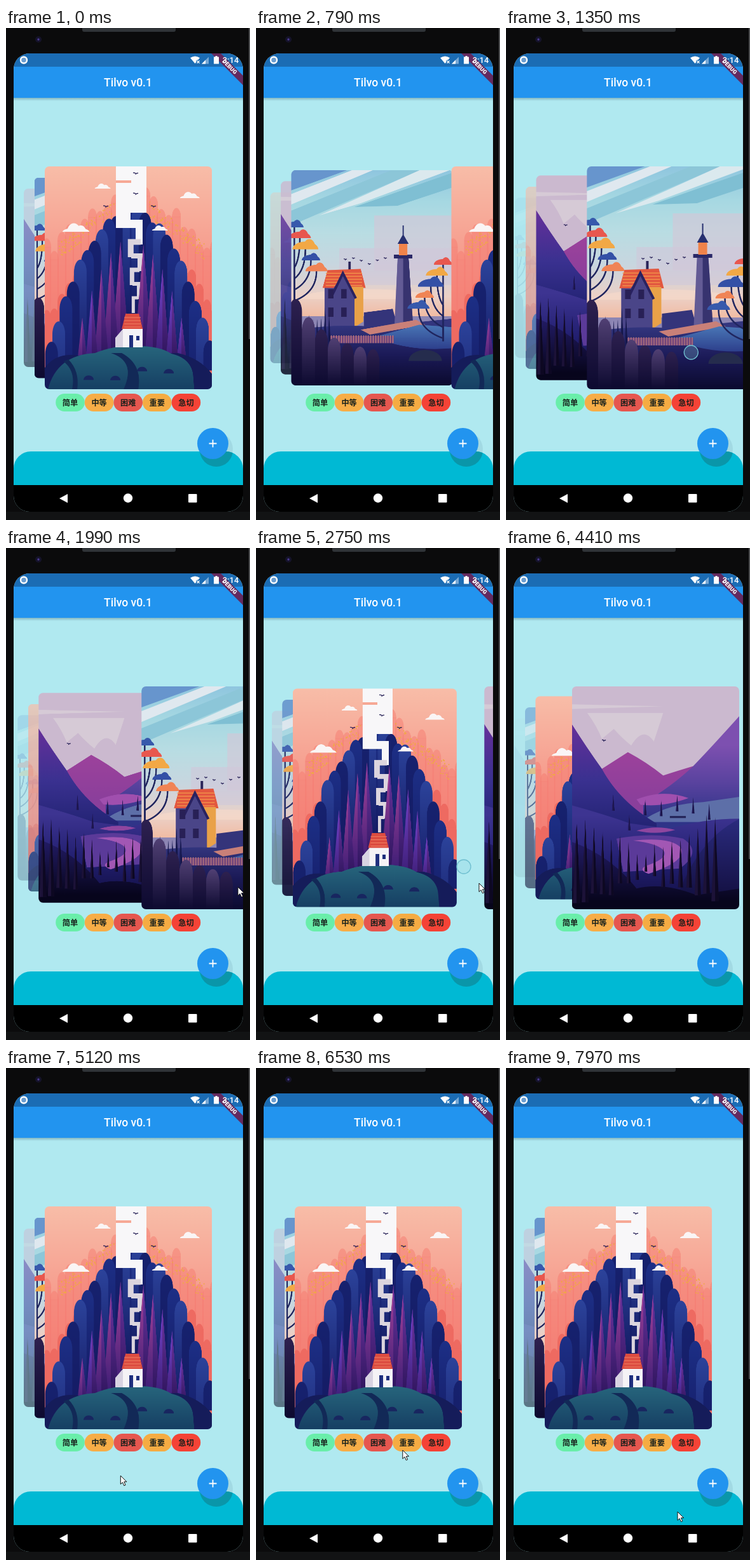
An HTML page with a canvas that plays this animation: 384x775 px, repeating every 8 s.

```html
<!DOCTYPE html>
<html lang="zh">
<head>
<meta charset="utf-8">
<title>Card carousel</title>
<style>
  html, body { margin: 0; width: 100%; height: 100%; overflow: hidden; background: #0b0b0c; }
  svg, canvas { position: absolute; left: 0; top: 0; }
  #cards { left: 12px; top: 218px; }
  text { text-anchor: middle; font-family: Roboto, sans-serif; fill: #fff; }
  #chips text { font: 700 12.2px "Noto Sans CJK SC", "Noto Sans CJK", sans-serif; fill: #17201c; }
</style>
</head>
<body>
<svg width="384" height="775">
  <defs>
    <clipPath id="screen"><rect x="12" y="40" width="361" height="722" rx="25"/></clipPath>
    <clipPath id="bar"><rect x="12" y="667" width="361" height="80" rx="27"/></clipPath>
    <linearGradient id="fade" x2="0" y2="1"><stop stop-color="#245" stop-opacity=".3"/><stop offset="1" stop-color="#245" stop-opacity="0"/></linearGradient>
  </defs>
  <rect y="762" width="384" height="13" fill="#121314"/>
  <rect x="382" width="2" height="490" fill="#4a4b4d"/>
  <rect x="120" y="-4" width="147" height="10" rx="3" fill="#303438"/>
  <circle cx="51" cy="18" r="5" fill="#15132a"/><circle cx="51" cy="18" r="1.7" fill="#4a3a94"/>
  <g clip-path="url(#screen)">
    <rect x="12" y="40" width="361" height="722" fill="#b0e9f0"/>
    <rect x="12" y="110" width="361" height="5" fill="url(#fade)"/>
    <rect x="12" y="61" width="361" height="49" fill="#2294ef"/>
    <rect x="12" y="40" width="361" height="21" fill="#1b6cb4"/>
    <path d="M323 40h15l35 35v15z" fill="#632a60"/>
    <text transform="translate(352 61) rotate(45)" y="3" font-size="8.9" font-weight="900">DEBUG</text>
    <circle cx="28" cy="50.500" r="5" fill="#6c9fd2" stroke="#fff" stroke-width="2.400"/>
    <path d="M290 47q7.500-5 15 0l-7.500 9z" fill="#fff"/>
    <path d="M300 51l4 4m0-4l-4 4" stroke="#1b6cb4" stroke-width="3"/><path d="M300.500 51.500l4 4m0-4l-4 4" stroke="#fff" stroke-width="1.200"/>
    <path d="M308 56.500l11-11v11z" fill="#78a9d6"/><path d="M308 56.500l6-6v6z" fill="#fff"/>
    <path d="M327 45.500h2.500v-1.500h3v1.500h2.500v11h-8z" fill="#fff"/>
    <text x="353.500" y="55" font-size="13" font-weight="500">3:14</text>
    <text x="192" y="92" font-size="17.500" font-weight="500">Tilvo v0.1</text>
    <circle cx="331" cy="663" r="26" fill="#246" opacity=".09"/>
    <rect x="12" y="667" width="361" height="80" rx="27" fill="#00b9d4"/>
    <circle cx="331" cy="665" r="26" fill="#0a96a9" clip-path="url(#bar)"/>
    <circle cx="325.500" cy="654.500" r="24.500" fill="#2294ef"/>
    <path d="M319.500 654.500h12m-6-6v12" stroke="#fff" stroke-width="1.800"/>
    <rect x="12" y="720" width="361" height="42"/>
  </g>
  <path d="M84 741l13-7v14z" fill="#fff"/><circle cx="192" cy="740.500" r="7.200" fill="#fff"/>
  <rect x="287" y="734" width="13.500" height="13.500" rx="1" fill="#fff"/>
  <g id="chips"></g>
</svg>
<canvas id="cards" width="361" height="352"></canvas>
<svg width="384" height="775">
  <circle id="touch" r="11" fill="#8ad2e0" fill-opacity=".25" stroke="#70bfd0" stroke-width="1.300"/>
  <path id="arrow" d="M0 0V13.500L3.200 10.600 5.500 15.800 7.800 14.800 5.500 9.700H9.700Z" fill="#fff" stroke="#111" stroke-linejoin="round"/>
</svg>
<script>
const $ = id => document.getElementById(id);
const chipX = i => 101 + i * 45.6;
$('chips').innerHTML = [['简单', '#69eeaa'], ['中等', '#f7ad47'], ['困难', '#e6574f'], ['重要', '#f5ac43'], ['急切', '#f44336']]
  .map(([word, color], i) => `<rect x="${chipX(i) - 22.8}" y="576" width="45.6" height="28" rx="14" fill="${color}"/><text x="${chipX(i)}" y="595">${word}</text>`).join('');

// Drawing helpers; g is the picture being painted
let g, seed = 7;
const rnd = () => (seed = seed * 16807 % 2147483647) / 2147483647;
const grad = (y0, y1, ...colors) => {
  const fill = g.createLinearGradient(0, y0, 0, y1);
  colors.forEach((c, i) => fill.addColorStop(i / (colors.length - 1), c));
  return fill;
};
const shape = (fill, d) => { g.fillStyle = fill; g.fill(new Path2D(d)); };
const line = (color, width, d) => { g.strokeStyle = color; g.lineWidth = width; g.stroke(new Path2D(d)); };
const rect = (fill, ...box) => { g.fillStyle = fill; g.fillRect(...box); };
const dome = (x, y, rx, ry, fill) => {
  g.fillStyle = fill;
  g.beginPath(); g.ellipse(x, y, rx, ry, 0, Math.PI, 0); g.fill();
};
const pillar = (x, top, w, bottom, fill) => {
  dome(x, top + w, w / 2, w, fill);
  g.fillRect(x - w / 2, top + w - .5, w, bottom - top - w);
};
const spike = (x, top, w, bottom, left, right) => {
  shape(left, `M${x} ${top}L${x - w / 2} ${bottom}H${x + w / 2}Z`);
  shape(right, `M${x} ${top}V${bottom}H${x + w / 2}Z`);
};
const cloud = (x, y, w) => {
  dome(x, y, w / 2, w * .15, '#faf5f5');
  dome(x - w * .08, y, w * .25, w * .32, '#faf5f5');
  dome(x + w * .18, y, w * .2, w * .24, '#faf5f5');
};
const bird = (x, y, s) => line('#241e55', 1.2, `M${x - s} ${y - s / 2}q${s} 0 ${s} ${s / 2}q${s / 2} ${-s / 2} ${s} ${-s / 3}`);
const picture = (scale, x, y, paint) => {
  const c = document.createElement('canvas');
  c.width = 526; c.height = 702;
  g = c.getContext('2d');
  g.scale(2 * scale, 2 * scale);
  g.translate(-x, -y);
  paint();
  return c;
};

const canyon = () => {
  rect(grad(218, 569, '#f8bda8', '#f69487', '#ee6d64'), 61, 218, 263, 351);
  for (const [top, slope, color] of [[225, .8, 'rgba(245,123,112,.5)'], [255, 1.3, '#ee6a61']])
    for (let x = 64; x < 330; x += 12) pillar(x, top + Math.abs(x - 197) * slope + rnd() * 32, 14, 569, color);
  for (let i = 0; i < 190; i++) {
    const side = i % 2 ? -1 : 1, d = 28 + rnd() * 86;
    rect('#f0a846', 197 + side * d, 252 + d * .75 + rnd() * 26, 1.7, 2);
  }
  const blues = ['#1d2f86', '#2c439b', '#17226f'];
  for (let k = 0; k < 12; k++) for (const side of [-1, 1]) {
    const d = k * 11.3, top = 280 + d * d * .0135 + rnd() * 12;
    pillar(196 + side * d, top, 20, 540, grad(top, top + 170, blues[k % 3], '#141a62'));
  }
  shape('#f8f7f9', 'M173 218H221V291H196V302H215V341H204V315H173Z');
  rect('#f6a895', 173, 240, 24, 4);
  for (let i = 0; i < 5; i++) {
    const reach = (8 - i) * (i % 2 ? 1 : -1), y = 337 + i * 22;
    line('#dcd5de', 9 - i, `M${204 - reach} ${y}H${204 + reach}V${y + 24}`);
  }
  for (let d = 18; d < 82; d += 15) for (const side of [-1, 1]) {
    const top = 328 + d * d * .02 + rnd() * 8, bottom = 494 + d * .45;
    spike(198 + side * d, top, 30 - d * .17, bottom,
      grad(top, bottom, rnd() > .5 ? '#a8439a' : '#7845cf', '#3d1e76'), grad(top, bottom, '#6d35a2', '#30165f'));
  }
  shape('#151c5a', 'M61 535Q80 510 115 516L270 512Q305 520 324 545V569H61Z');
  shape(grad(500, 569, '#27667d', '#163f63'), 'M66 569Q80 515 140 512Q170 500 200 501Q240 500 260 513Q290 520 294 545L296 569Z');
  shape('#122957', 'M165 512Q205 525 185 569H208Q215 530 182 512ZM90 525Q110 540 104 569H112Q116 540 98 522Z');
  for (let x = 130; x < 280; x += 42) dome(x, 540 + rnd() * 18, 8, 7, '#182660');
  shape('#f5f3f6', 'M172 503V488L184 474H215V503Z');
  shape('#d8d3e2', 'M172 503V488L184 474V503Z');
  shape('#dc4c40', 'M188 450H209L215 474H182Z');
  for (let y = 456; y < 474; y += 5) line('#f08062', 1, `M186 ${y}H212`);
  rect('#1f2f7d', 194, 484, 6, 19); rect('#1f2f7d', 205, 485, 5, 7);
  cloud(110, 321, 42); cloud(152, 253, 25); cloud(242, 319, 25); cloud(289, 268, 31);
  for (const x of [157, 232]) bird(x, 282, 4);
  for (const y of [230, 262]) bird(204, y, 4);
};

const leaves = ['#3759ac', '#e8574e', '#f2a845', '#3350a6', '#f08455'];
const leafTree = (x, top, lean, shift) => {
  for (let i = 0; i < 5; i++) {
    const bx = x + lean * i, y = top + 18 * i, r = 15 + i % 3 * 3, color = leaves[(i + shift) % 5];
    line('#20265f', 2.5, `M${bx} ${y}Q${bx} ${y + 34} ${x} ${y + 48}V${top + 125}`);
    dome(bx, y, r, r * .6, color);
    dome(bx + r * .3, y, r * .5, r * .8, color);
  }
};

const lighthouse = () => {
  rect(grad(218, 475, '#8fc6df', '#a6d8e2', '#b9dde3', '#c8d6df', '#ecd0c6', '#f4b08f'), 127, 218, 263, 351);
  shape('#6795cd', 'M127 218H218L127 251Z');
  shape('#dfe8ef', 'M127 257L226 218H260L127 274Z');
  shape('#8cc6d8', 'M127 284L290 218H336L127 308Z');
  shape('#dbe9ee', 'M172 292L336 218H385L240 272Z');
  shape('#7fbfd3', 'M230 278L390 222V246L300 276Z');
  g.globalAlpha = .6;
  rect('#d6c6d8', 262, 292, 128, 90); rect('#d0c9da', 205, 345, 185, 60);
  dome(250, 428, 110, 16, '#f9dccb');
  g.globalAlpha = 1;
  rect('#8d86b4', 127, 456, 263, 30);
  // tower
  shape('#34347a', 'M245 473V450L292 444L300 473Z');
  shape('#635b95', 'M300 362H318L325 468H295Z');
  shape('#37336f', 'M309 362H318L325 468H309Z');
  rect('#2a2867', 294, 356, 30, 6); rect('#f0834a', 302, 337, 14, 20);
  shape('#27306f', 'M300 338L308 324V308H310V324L318 338Z');
  // house
  rect('#2a2459', 220, 367, 4, 22);
  shape('#e2573f', 'M186 381L240 379L248 410H178Z');
  for (let y = 386; y < 408; y += 5) line('#f59a4c', 1.2, `M183 ${y}H242`);
  shape('#4a4588', 'M181 410H196L211 388L230 425V474H181Z');
  shape('#e9a148', 'M225 408H244V465L230 474V424Z');
  line('#292260', 4, 'M193 423L211 386L232 427');
  for (const x of [187, 208]) for (const y of [412, 442]) rect('#282056', x, y, 9, 15);
  // meadow
  shape(grad(470, 569, '#33367f', '#1b1a57', '#0b0a2e'), 'M127 480Q190 468 260 473L390 460V569H127Z');
  shape('#c98078', 'M240 478L330 462L345 470L255 486Z');
  shape(grad(465, 510, '#4d7dbb', '#2d3f8c'), 'M262 490L335 470L390 474V508Q320 515 262 490Z');
  rect('#72457c', 190, 488, 104, 12);
  for (let x = 192; x < 294; x += 4) rect('#c9857b', x, 487, 1, 13);
  dome(345, 529, 27, 18, '#252c4d');
  leafTree(132, 311, 9, 0);
  leafTree(374, 372, -10, 1);
  for (let x = 130; x < 190; x += 6.5) spike(x, 435 + rnd() * 30, 8, 530, '#1b1d58', '#141648');
  for (let i = 6; i >= 0; i--) {
    const top = 428 + 90 * (1 - Math.exp(-i / 2.5));
    pillar(134 + i * 21, top, 21, 569, grad(top, 569, i % 2 ? '#514074' : '#2e2150', '#0d0a30'));
  }
  for (let x = 215; x < 285; x += 13) bird(x, 352 + rnd() * 26, 2.5);
};

const valley = () => {
  rect('#cbb9cf', 53, 226, 252, 336);
  shape('#d6cad6', 'M53 253L190 256L53 260ZM76 266H190Q184 285 176 309Q160 285 142 315Q126 302 116 290L98 305Q90 285 76 266Z');
  shape(grad(325, 400, '#9d429c', '#8a3f9b'), 'M80 362L98 350Q120 336 137 325Q165 340 190 360Q215 352 235 346L305 380V420H80Z');
  shape(grad(315, 425, '#7d50b0', '#5a439f', '#2f3488'), 'M305 270Q262 318 235 346Q205 375 160 402V440H305Z');
  shape('#5d6fa8', 'M165 424Q200 402 250 400L305 392V430H165Z');
  shape('#a04fae', 'M150 396Q190 380 228 394Q190 408 156 404Z');
  shape(grad(285, 450, '#65309a', '#3a3190', '#1f216f'), 'M53 283Q75 318 98 350Q125 400 180 432V562H53Z');
  shape(grad(420, 562, '#3d3491', '#221f70', '#100d3e'), 'M53 405Q100 418 140 432L200 440Q250 425 305 425V562H53Z');
  shape('#8f469f', 'M150 443Q180 434 208 442Q180 450 150 443Z');
  shape('#5b3a99', 'M120 455Q175 445 220 455Q250 475 215 500L130 505Z');
  shape('#a257b4', 'M145 458Q200 452 216 468Q228 488 168 508Q152 502 164 496Q200 484 190 472Q180 462 145 458Z');
  shape(grad(430, 562, '#2a2a7c', '#100c38'), 'M305 425Q235 460 205 562H305Z');
  shape(grad(460, 550, '#231c66', '#07051c'), 'M53 460Q110 480 150 530Q190 520 240 540L305 530V562H53Z');
  rect('#232257', 200, 421, 24, 3);
  for (let x = 60; x < 280; x += 13) {
    const d = Math.abs(x - 165), bottom = 500 + d * .4 + rnd() * 20;
    spike(x, bottom - 22 - d * .9 - rnd() * 25, 4 + d * .07, bottom, '#1c1238', '#0d0822');
  }
  for (let x = 115; x < 260; x += 24) {
    const y = 385 + rnd() * 40;
    spike(x, y, 4, y + 24, '#231a5a', '#1a1448');
  }
  bird(101, 308, 3);
};

const art = [picture(1, 61, 218, canyon), picture(1, 127, 218, lighthouse), picture(1 / .955, 53, 226, valley)];

// Motion: full swipes start at these times; one short pull springs back
const swipes = [470, 1760, 2375, 2960, 3493, 4300], swipeTime = 525;
const unit = v => Math.min(1, Math.max(0, v));
const ease = v => { const u = unit(v); return u * u * (3 - 2 * u); };
const pageAt = t => .184 * Math.sin(Math.PI * unit((t - 1160) / 450))
  + swipes.reduce((sum, start) => sum + ease((t - start) / swipeTime), 0);

const show = (id, visible, x, y) => {
  $(id).style.display = visible ? '' : 'none';
  $(id).setAttribute('transform', `translate(${x} ${y})`);
};
// Pointer moves: start, end, x, y
const moves = [[5080, 5580, chipX(0) - 9, 596], [5770, 6390, chipX(3) - 7, 602], [6530, 6860, chipX(4) - 6, 598],
  [7000, 7300, chipX(3) - 7, 598], [7460, 7960, 270, 699]];
const drawPointer = t => {
  const early = t < 2300, pulled = t < 1420;
  const [x, y] = moves.reduce(([x, y], [start, end, toX, toY]) => {
    const u = ease((t - start) / (end - start));
    return [x + (toX - x) * u, y + (toY - y) * u];
  }, t > 5040 ? [182, 643] : early ? [365, 534] : [351, 528]);
  show('arrow', t > 5040 || t > 1940 && t < 2080 || t > 2700 && t < 2860, x, y);
  show('touch', t > 1200 && pulled || t > 2600 && t < 2800, pulled ? 291 + (t - 1350) * .3 : 327, pulled ? 511 : 502);
};

const ctx = $('cards').getContext('2d');
const drawCards = page => {
  ctx.clearRect(0, 0, 361, 352);
  const front = Math.floor(page);
  for (let i = front + 3; i >= front; i--) {
    const depth = i - page, back = Math.max(depth, 0);
    const h = 351 - 35 * back, x = 49 - depth * (depth > 0 ? 16.5 : 371);
    ctx.save();
    ctx.globalAlpha = unit(1.5 - back / 2);
    ctx.beginPath();
    ctx.roundRect(x, 17.5 * back, h * .75, h, 7);
    ctx.clip();
    ctx.drawImage(art[i % 3], x, 17.5 * back, h * .75, h);
    ctx.restore();
  }
};

const begin = performance.now();
const frame = () => {
  const t = (performance.now() - begin) % 8000;
  drawCards(pageAt(t));
  drawPointer(t);
  requestAnimationFrame(frame);
};
frame();
</script>
</body>
</html>
```
